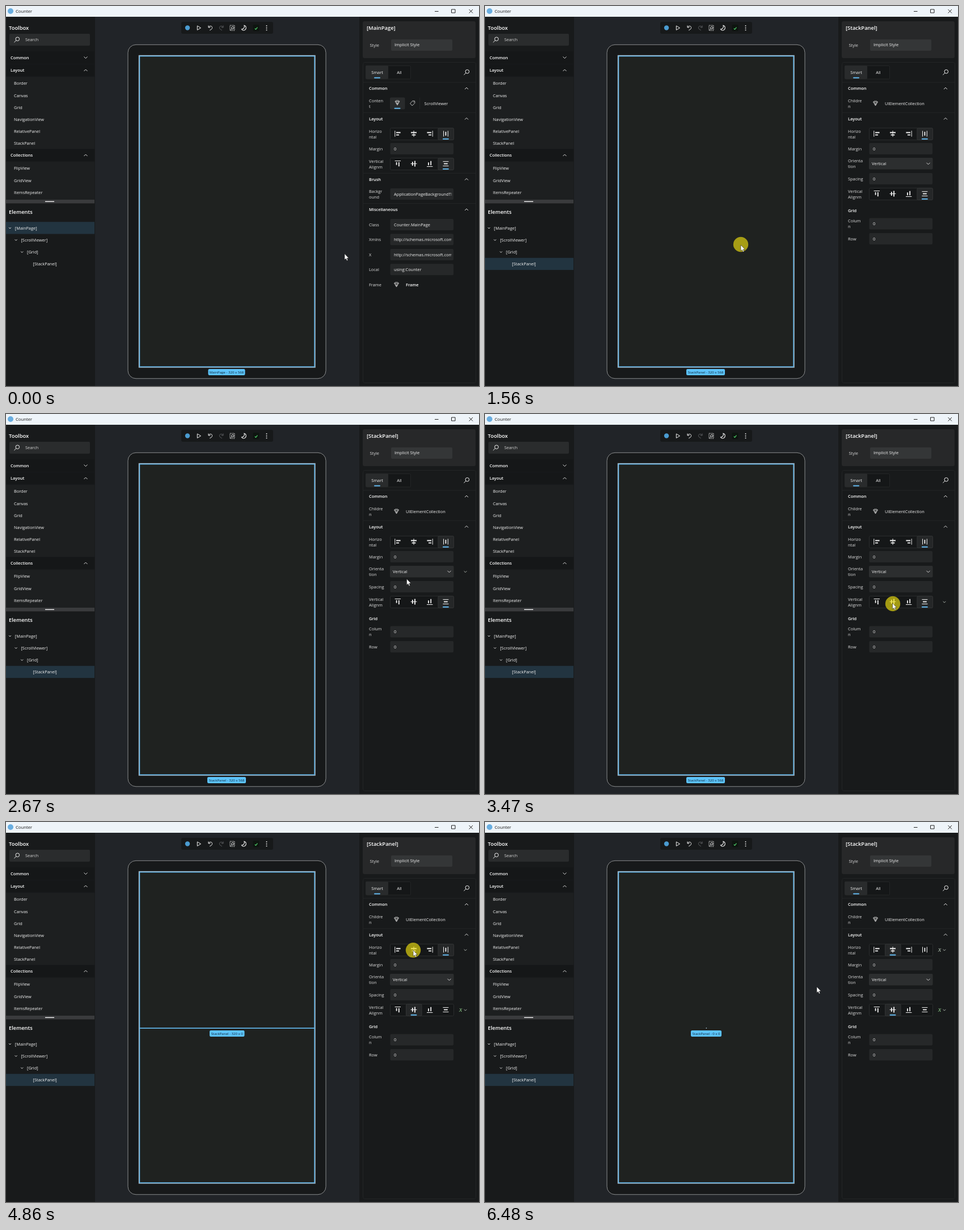
An HTML page for the animation above (6570 ms loop, 834 px wide and 671 px high).

```html
<!DOCTYPE html>
<html lang="en">
<head>
<meta charset="utf-8">
<title>Counter</title>
<style>
html, body { margin: 0; width: 100%; height: 100%; overflow: hidden; background: #181a1b; }
svg { display: block; width: 100vw; height: 100vh; }
text { font-family: "Open Sans", "Noto Sans", sans-serif; white-space: pre; }
</style>
</head>
<body>
<svg id="stage" viewBox="0 0 834 671" xmlns="http://www.w3.org/2000/svg">
<defs><clipPath id="field"><rect x="679" y="90" width="106.5" height="500"/></clipPath></defs>
</svg>
<script>
const LOOP = 6570;
const BLUE = '#62b6ec';
const WHITE = '#f2f2f2';
const stage = document.getElementById('stage');
let parent = stage;

function el(name, attrs) {
  const e = document.createElementNS('http://www.w3.org/2000/svg', name);
  for (const k in attrs) e.setAttribute(k, attrs[k]);
  return parent.appendChild(e);
}
function group(draw, attrs = {}) {
  const g = el('g', attrs), outer = parent;
  parent = g;
  draw();
  parent = outer;
  return g;
}
const rect = (x, y, width, height, fill, more) => el('rect', { x, y, width, height, fill, ...more });
const line = (d, stroke = WHITE, w = 1, more) => el('path', { d, fill: 'none', stroke, 'stroke-width': w, ...more });
const disc = (cx, cy, r, fill) => el('circle', { cx, cy, r, fill });
// y is the vertical middle of the text
function text(s, x, y, size = 7.4, weight = 400, fill = WHITE, more) {
  const t = el('text', { x, y: y + size * 0.36, 'font-size': size, 'font-weight': weight, fill, ...more });
  t.textContent = s;
  return t;
}
const bold = (s, x, y, size = 7.4) => text(s, x, y, size, 600, '#fff');
const chevron = (x, y, up, r = 3, color = '#d8d8d8') =>
  line(`M${x - r} ${y + (up ? r / 2 : -r / 2)}l${r} ${up ? -r : r}l${r} ${up ? r : -r}`, color, 1);
const lens = (x, y) => {
  el('circle', { cx: x + 1.3, cy: y - 1.2, r: 3.3, fill: 'none', stroke: WHITE });
  line(`M${x - 1.2} ${y + 1.3}l-3.4 3.4`);
};

// Window frame and canvas
rect(0, 0, 834, 671, '#181a1b');
rect(157, 19, 466, 652, '#212428');
rect(0, 0, 834, 19, '#eef4f9');
disc(8, 9, 5, '#6aaee0');
text('Counter', 17, 9.3, 7.7, 400, '#1a1a1a');
line('M756 9.5h6.5M785.5 6h6.5v6h-6.5zM816.5 6l6.5 6.5M823 6l-6.5 6.5', '#222');

// Left side
bold('Toolbox', 5, 38.5, 9.4);
rect(6, 49, 142, 21, '#2a2c2d', { rx: 2 });
lens(19, 59.5);
text('Search', 34, 59.5, 7.4, 400, '#d6d6d6');
rect(0, 80, 156, 262, '#1d1f20');
function section(name, y, up, items) {
  rect(0, y - 11, 156, 22, '#151718');
  bold(name, 8, y);
  chevron(140.5, y, up);
  items.forEach((s, i) => text(s, 14, y + 23.3 + i * 21.2));
}
section('Common', 91, false, []);
section('Layout', 113.5, true, ['Border', 'Canvas', 'Grid', 'NavigationView', 'RelativePanel', 'StackPanel']);
section('Collections', 263.5, true, ['FlipView', 'GridView', 'ItemsRepeater']);
rect(0, 342, 156, 6.5, '#3a3b3d');
rect(69, 344.6, 16, 1.4, '#f0f0f0');
bold('Elements', 5, 364, 9.4);
const treeRow = rect(0, 381, 156, 21.3, '#223440');
['MainPage', 'ScrollViewer', 'Grid', 'StackPanel'].forEach((s, i) => {
  const y = 392 + i * 21.2;
  text(`[${s}]`, 15.8 + i * 10.6, y);
  if (i < 3) chevron(7 + i * 10.6, y, false, 2);
});

// Toolbar
rect(309, 28, 162, 21, '#17191a', { rx: 3 });
disc(320, 38.5, 4.2, '#4a9bd0');
line('M337.3 35v7.4l6.2-3.7z');
line('M357 34.5v3.4h3.4M357.2 37.6c2-3.4 6.4-2.6 6.4.8 0 2-2 3.4-4.4 4.4');
line('M383 34.5v3.4h-3.4M382.8 37.6c-2-3.4-6.4-2.6-6.4.8 0 2 2 3.4 4.4 4.4', '#5c5e60');
line('M395 34.2h8v9h-8z', WHITE, 1, { 'stroke-dasharray': '1.6 1.2' });
el('circle', { cx: 399.8, cy: 38.6, r: 2.1, fill: '#17191a', stroke: WHITE });
line('M398.2 40.2l-2.4 2.4');
line('M420 34.4c1.2 3.6-1 6.2-4.6 6.6 1 1.6 3 2.3 4.8 1.7 4-1.2 4.2-7.2-.2-8.3z', WHITE, 1.1);
rect(435.5, 33, 11, 11.5, '#0e1510', { rx: 2 });
line('M438.8 39.6l1.6 1.7 3-3.6', '#4fd06a', 1.3);
[35, 38.7, 42.4].forEach(y => disc(459.5, y, 0.95, WHITE));

// Device
rect(215, 68.3, 349, 589.5, '#17191a', { rx: 14, stroke: '#8b8d8e', 'stroke-width': 1 });
rect(234.5, 87.5, 310.5, 550.5, '#1f2220', { stroke: '#b4bcc2', 'stroke-width': 1.4 });
rect(235.5, 88.5, 308.5, 548.5, 'none', { stroke: BLUE, 'stroke-width': 1.5 });
const midLine = rect(236, 363.2, 308, 1.7, BLUE);
const dot = rect(389.7, 363.3, 1.3, 1.3, '#cfe6f5');
function chip(s, x, y, w) {
  return group(() => {
    rect(x, y, w, 11, '#5cc3fb', { rx: 2.2 });
    text(s, x + w / 2, y + 5.5, 6.1, 400, '#0f2836', { 'text-anchor': 'middle' });
  });
}
const chips = [
  chip('MainPage - 320 x 568', 356.5, 641, 65),
  chip('StackPanel - 320 x 568', 355, 641, 68),
  chip('StackPanel - 320 x 0', 359, 368, 61.5),
  chip('StackPanel - 0 x 0', 363, 368, 54)
];

// Right side
rect(629, 27, 199, 65, '#272829', { rx: 3 });
const titles = ['[MainPage]', '[StackPanel]'].map(s => bold(s, 636, 38.5, 9.4));
text('Style', 641.5, 69, 7.4, 400, '#d8d8d8');
rect(679, 59, 108, 20, '#343637', { rx: 2 });
text('Implicit Style', 685, 68.3, 7.5);
rect(629.5, 99.5, 199, 566, 'none', { rx: 3, stroke: '#232526' });
rect(634.5, 105.5, 79, 23.5, '#151718', { stroke: '#242627', rx: 2 });
rect(634, 105, 40, 24, '#292b2c', { rx: 2 });
rect(649, 125.8, 11, 2, BLUE, { rx: 1 });
text('Smart', 654.5, 117.3, 7.4, 400, WHITE, { 'text-anchor': 'middle' });
text('All', 693.5, 117.3, 7.4, 400, WHITE, { 'text-anchor': 'middle' });
lens(812, 117);

function head(name, y) {
  line(`M630 ${y - 10.7}h198`, '#242627');
  bold(name, 640, y);
  chevron(812, y, true);
}
function label(s, y) {
  const parts = s.split('|'), n = parts.length;
  parts.forEach((p, i) => text(p, 640, y + (i - (n - 1) / 2) * 10, 7.4, 400, '#dedede'));
}
function field(name, y, value) {
  label(name, y);
  const box = rect(677.5, y - 10, 111.5, 20, '#262829', { rx: 2 });
  text(value, 684, y, 7.4, 400, WHITE, { 'clip-path': 'url(#field)' });
  return box;
}
function gem(x, y) {
  line(`M${x - 4} ${y - 2.5}h8l-4 6.6zM${x - 2} ${y - 2.2}l2 5.6 2-5.6M${x - 4} ${y - 2.5}l2-1.6h4l2 1.6M${x - 1.8} ${y + 0.6}h3.6`, '#cfcfcf', 0.8);
}
// Alignment icons, drawn around 0,0 for the horizontal case
const ICONS = [
  () => { line('M-5-5.2v10.4'); line('M-2.8-2h7.6M-2.8 2.2h5', WHITE, 1.8); },
  () => { line('M0-5.4v10.8'); line('M-5-2h10M-3.4 2.2h6.8', WHITE, 1.8); },
  () => { line('M5-5.2v10.4'); line('M2.8-2h-7.6M2.8 2.2h-5', WHITE, 1.8); },
  () => { line('M-3.9-5v10M3.9-5v10'); line('M0-3.4v6.8', WHITE, 1.8); }
];
function aligner(name, y, turn) {
  label(name, y);
  rect(677.5, y - 10.5, 112, 21, '#151718', { rx: 2, stroke: '#2a2c2d' });
  const back = rect(0, y - 10.5, 27.5, 21, '#252728', { rx: 2, stroke: '#323435' });
  ICONS.forEach((draw, i) =>
    group(draw, { transform: `translate(${690.8 + i * 28.2} ${y - 0.5}) rotate(${turn})` }));
  const bar = rect(0, y + 7.7, 11, 2, BLUE, { rx: 1 });
  return (i, marked) => {
    back.setAttribute('x', 677.3 + i * 28.2);
    bar.setAttribute('x', 685.3 + i * 28.2);
    show(bar, marked);
  };
}
function show(e, on) { e.style.display = on ? '' : 'none'; }

const pagePanel = group(() => {
  head('Common', 145.5);
  label('Conten|t', 172);
  rect(677, 161.5, 26.5, 21, '#292b2c', { rx: 2 });
  gem(690, 171);
  rect(684.5, 179.7, 11, 2, BLUE, { rx: 1 });
  line('M712.5 172l4.5-4.4 3.6.2.2 3.6-4.6 4.6z', '#cfcfcf', 0.9);
  disc(718.7, 169.6, 0.6, '#cfcfcf');
  line('M729.5 162v20', '#242627');
  text('ScrollViewer', 737.5, 172);
  head('Layout', 199);
  aligner('Horizo|ntal', 226, 0)(3, true);
  field('Margin', 252, '0');
  aligner('Vertical|Alignm', 279, 90)(3, true);
  head('Brush', 306);
  field('Backgr|ound', 332, 'ApplicationPageBackgroundThemeBrush');
  head('Miscellaneous', 359.5);
  field('Class', 386, 'Counter.MainPage');
  field('Xmlns', 412.3, 'http://schemas.microsoft.com/winfx');
  field('X', 439, 'http://schemas.microsoft.com/winfx');
  field('Local', 465.3, 'using:Counter');
  label('Frame', 492);
  gem(688.5, 492);
  bold('Frame', 705, 492);
});

const ROWS = [226, 252, 278.5, 305, 332];
let setH, setV, marginBox, marks, fx;
const stackPanel = group(() => {
  head('Common', 145.5);
  label('Childre|n', 172);
  gem(688.5, 172);
  text('UIElementCollection', 705, 172);
  head('Layout', 199);
  setH = aligner('Horizo|ntal', 226, 0);
  marginBox = field('Margin', 252, '0');
  label('Orienta|tion', 278.5);
  rect(677, 268, 112.5, 20.5, '#2c2e2f', { rx: 2 });
  text('Vertical', 682, 278.5);
  chevron(781.5, 278.3, false);
  field('Spacing', 305, '0');
  setV = aligner('Vertical|Alignm', 332, 90);
  bold('Grid', 640, 361);
  field('Colum|n', 384.6, '0');
  field('Row', 411, '0');
  marks = ROWS.map(y => chevron(810, y, false, 2.4, '#a9b0a9'));
  fx = [226, 332].map((y, i) => text('x', 799, y - 1.2, 12, 400, i ? '#8fd08a' : '#b9cbb6',
    { style: 'font-family:"Liberation Serif",serif;font-style:italic' }));
});

const ring = disc(0, 0, 13.2, '#efe010');
const pointer = el('path', {
  d: 'M0 0V10.6L2.4 8.4 4.1 12.3 5.8 11.6 4.2 7.8H7.4Z',
  fill: '#fff', stroke: '#111', 'stroke-width': 0.5
});

// Pointer moves: start, end, steps, from, control, to, easing
const smooth = p => p * p * (3 - 2 * p);
const easeOut = p => p * (2 - p);
const easeIn = p => p * p;
const MOVES = [
  [530, 1000, 8, [597, 437.5], [524, 429], [451, 422], smooth],
  [1930, 2550, 10, [451, 422], [568, 403], [706.5, 290.5], easeOut],
  [2610, 3130, 8, [706.5, 290.5], [709, 316], [718.5, 334], easeIn],
  [3840, 4050, 4, [718.5, 334], [722, 290], [721, 247.5], smooth],
  [4120, 4330, 4, [721, 247.5], [720, 236], [718, 226.5], easeOut],
  [5970, 6480, 9, [718, 226.5], [655, 250], [585, 291], smooth]
];
function pointerAt(t) {
  let pos = MOVES[0][3];
  for (const [a, b, n, from, ctrl, to, ease] of MOVES) {
    if (t < a) break;
    const k = Math.min(n - 1, Math.floor((t - a) / (b - a) * (n - 1) + 1e-6));
    const s = ease((k + 1) / n), r = 1 - s;
    pos = from.map((v, i) => r * r * v + 2 * r * s * ctrl[i] + s * s * to[i]);
  }
  return pos;
}

// Click ring: time, opacity, x, y
const RING = [
  [0, 0, 0, 0],
  [1290, 0.65, 451, 421], [1930, 0.4, 451, 421], [2000, 0.2, 451, 421], [2070, 0, 0, 0],
  [3410, 0.65, 719, 335], [3980, 0.52, 719, 335], [4050, 0.4, 719, 335], [4120, 0, 0, 0],
  [4860, 0.65, 718, 226.3], [5520, 0.35, 718, 226.3], [5600, 0, 0, 0]
];
// time, button, marked
const H_STATE = [[0, 3, true], [4920, 1, false], [5520, 1, true]];
const V_STATE = [[0, 3, true], [3480, 1, false], [3910, 1, true]];
const CHIP = [[0, 0], [1470, 1], [3910, 2], [5520, 3]];
const last = (list, t) => list.filter(e => e[0] <= t).pop();

function render(t) {
  const [x, y] = pointerAt(t);
  pointer.setAttribute('transform', `translate(${x} ${y})`);
  const [, alpha, rx, ry] = last(RING, t);
  ring.setAttribute('cx', rx);
  ring.setAttribute('cy', ry);
  ring.setAttribute('opacity', alpha);

  const chosen = last(CHIP, t)[1];
  chips.forEach((c, i) => show(c, i === chosen));
  show(midLine, chosen === 2);
  show(dot, chosen === 3);

  const stack = t >= 1470;
  treeRow.setAttribute('y', stack ? 444.8 : 381.2);
  titles.forEach((e, i) => show(e, stack === (i === 1)));
  show(pagePanel, !stack);
  show(stackPanel, stack);

  setH(...last(H_STATE, t).slice(1));
  setV(...last(V_STATE, t).slice(1));
  const set = [chosen === 3, false, false, false, chosen >= 2];
  const over = ROWS.map(r => x > 630 && Math.abs(y - r) <= 13.2);
  marks.forEach((m, i) => show(m, set[i] || over[i]));
  marginBox.setAttribute('fill', over[1] ? '#2c2e2f' : '#262829');
  show(fx[0], set[0]);
  show(fx[1], set[4]);
}

const start = performance.now();
function tick() {
  render((performance.now() - start) % LOOP);
  requestAnimationFrame(tick);
}
render(0);
requestAnimationFrame(tick);
</script>
</body>
</html>
```
